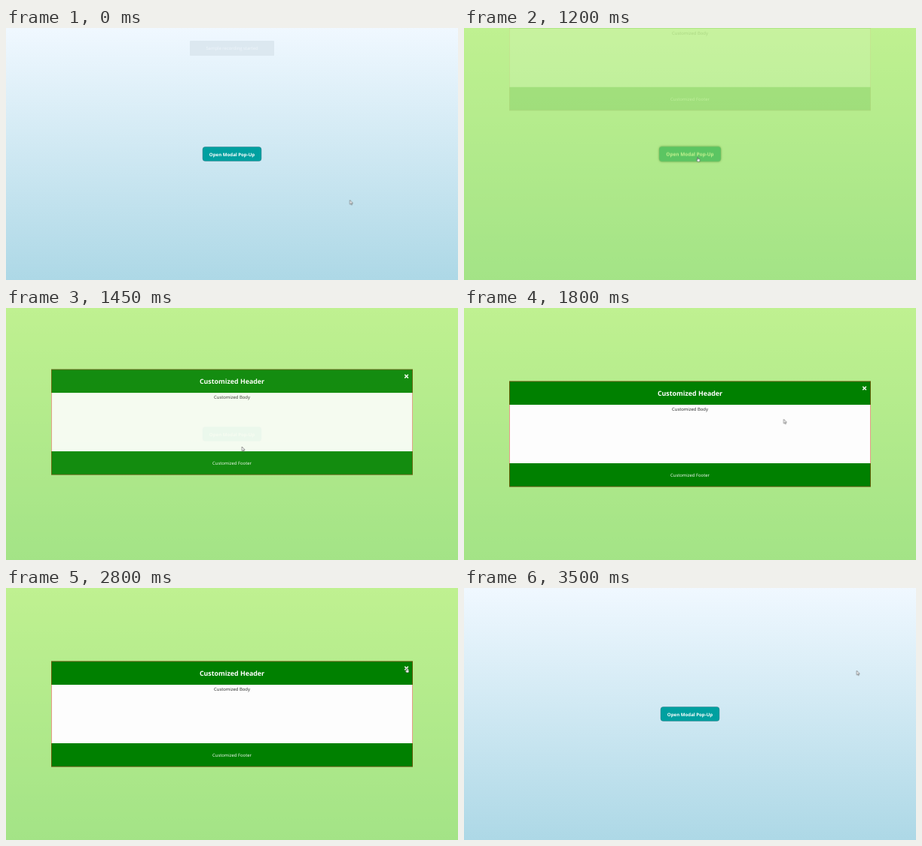
Write an HTML page that moves like this. It is 600 px wide and 336 px high and loops after 3550 ms.

```html
<!DOCTYPE html>
<html lang="en">
<head>
<meta charset="utf-8">
<title>Modal pop-up</title>
<style>
  html, body { margin: 0; width: 100%; height: 100%; overflow: hidden; }
  body { background: linear-gradient(aliceblue, lightblue); }
  svg { display: block; width: 100%; height: 100%; }
  text {
    font-family: "Open Sans", "Noto Sans", sans-serif;
    font-size: 5.9px;
    text-anchor: middle;
    text-rendering: geometricPrecision;
    fill: #fff;
  }
  .bold { font-weight: 700; }

  .caption, .button, .face, .overlay, .modal, .cursor, .arrow, .hand {
    animation: 3550ms linear infinite;
  }

  .caption { animation-name: caption; animation-timing-function: step-end; }
  .caption text { fill: #eef5fa; }
  @keyframes caption {
    0% { visibility: visible; }
    2.81%, 100% { visibility: hidden; }
  }

  .button { animation-name: button; transform-origin: 300px 168px; }
  .button text { font-size: 6.1px; }
  @keyframes button {
    0%, 19.4% { transform: scale(1); filter: drop-shadow(0 0 0 rgba(0, 0, 0, 0)); }
    23.6%, 34.9% { transform: scale(1.05); filter: drop-shadow(0 0 1.3px rgba(0, 0, 0, .5)); }
    39.1%, 100% { transform: scale(1); filter: drop-shadow(0 0 0 rgba(0, 0, 0, 0)); }
  }

  .face { animation-name: face; stroke: rgba(70, 110, 130, .8); stroke-width: .5; }
  @keyframes face {
    0%, 19.4% { fill: #00a0a0; }
    23.6%, 34.9% { fill: #009090; }
    39.1%, 100% { fill: #00a0a0; }
  }

  .overlay { animation-name: open; animation-timing-function: step-end; }
  @keyframes open {
    0% { visibility: hidden; }
    33.8% { visibility: visible; }
    80.28%, 100% { visibility: hidden; }
  }

  .modal { animation-name: drop; }
  @keyframes drop {
    0%, 32.11% {
      transform: translateY(-147px);
      opacity: 0;
      animation-timing-function: ease;
    }
    46.48%, 100% { transform: none; opacity: 1; }
  }
  .bar { fill: green; }
  .title { font-size: 8.85px; }

  .cursor { animation-name: move; }
  @keyframes move {
    0%, 2.82% { transform: translate(456.5px, 229.5px); }
    5.63% { transform: translate(410px, 180px); }
    8.45% { transform: translate(340px, 136px); }
    11.27% { transform: translate(281px, 133px); }
    14.08% { transform: translate(330px, 131px); }
    16.9% { transform: translate(384px, 134px); }
    18.31% { transform: translate(356px, 149px); }
    19.72% { transform: translate(333px, 162px); }
    21.13% { transform: translate(321.5px, 167px); }
    26.76% { transform: translate(313px, 170.5px); }
    30.99%, 35.21% { transform: translate(310.2px, 172.2px); }
    40.85% { transform: translate(313px, 185px); }
    43.66% { transform: translate(335px, 180px); }
    50.7% { transform: translate(424px, 148.5px); }
    56.34% { transform: translate(490px, 123px); }
    63.38% { transform: translate(528px, 110px); }
    70.42%, 85.92% { transform: translate(531.7px, 106.8px); }
    98.59%, 100% { transform: translate(521.3px, 110.3px); }
  }

  .arrow, .hand { fill: #fff; stroke: #333; stroke-width: .5; stroke-linejoin: round; }
  .arrow, .hand { animation-timing-function: step-end; }
  .arrow { animation-name: arrow; }
  .hand { animation-name: hand; }
  @keyframes arrow {
    0% { visibility: visible; }
    19.71% { visibility: hidden; }
    35.21% { visibility: visible; }
    64.78% { visibility: hidden; }
    80.28%, 100% { visibility: visible; }
  }
  @keyframes hand {
    0% { visibility: hidden; }
    19.71% { visibility: visible; }
    35.21% { visibility: hidden; }
    64.78% { visibility: visible; }
    80.28%, 100% { visibility: hidden; }
  }
</style>
</head>
<body>
<svg viewBox="0 0 600 336" preserveAspectRatio="none">
  <g class="caption">
    <rect x="244" y="17" width="112" height="20" rx="1" fill="#dce8f0"/>
    <text x="300" y="29.2">Sample recording started</text>
  </g>

  <g class="button">
    <rect class="face" x="261" y="158.5" width="78" height="19" rx="3.5"/>
    <text class="bold" x="300" y="170.7">Open Modal Pop-Up</text>
  </g>

  <g class="overlay">
    <rect width="600" height="336" fill="rgba(158, 236, 66, .58)"/>
    <g class="modal">
      <rect x="60" y="97.5" width="480" height="141" fill="#fdfdfd"/>
      <rect class="bar" x="60" y="97.5" width="480" height="31.5"/>
      <rect class="bar" x="60" y="207" width="480" height="31.5"/>
      <rect x="60.4" y="97.9" width="479.2" height="140.2" fill="none" stroke="rgba(200, 50, 10, .6)" stroke-width=".8"/>
      <text class="bold title" x="300" y="117.2">Customized Header</text>
      <text x="300" y="136.9" style="fill:#222">Customized Body</text>
      <text x="300" y="225.2">Customized Footer</text>
      <path d="M529.3 104.7l4.6 4.6m0-4.6l-4.6 4.6" stroke="#fff" stroke-width="1.5"/>
    </g>
  </g>

  <g class="cursor">
    <path class="arrow" d="M0 0V5.6L1.3 4.4 2.2 6.4 3 6 2.2 4.1H4Z"/>
    <path class="hand" d="M-.5 .4Q0-.4 .5 .4V2.3L2.6 2.7Q3.2 2.9 3.1 3.6L2.6 6H-.2L-1.8 3.8Q-1.5 3-.5 3.8Z"/>
  </g>
</svg>
</body>
</html>
```
